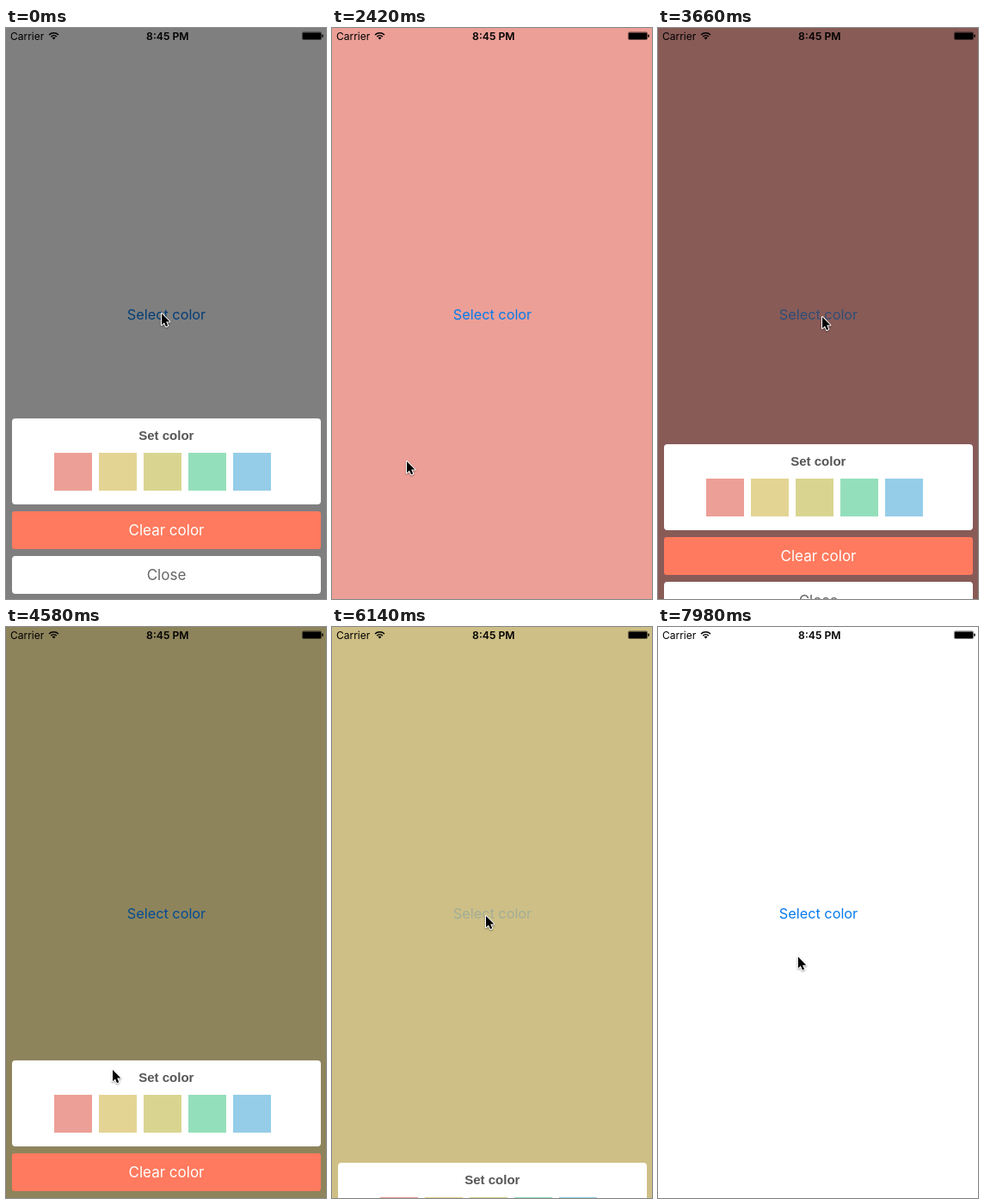
Recreate the animation shown at these times as an HTML page with a canvas. Size 372 px wide and 664 px high, loop 8 s.

```html
<!DOCTYPE html>
<html lang="en">
<head>
<meta charset="utf-8">
<title>Color sheet</title>
<style>
html, body { margin: 0; width: 100%; height: 100%; overflow: hidden; background: #fff; }
canvas { display: block; width: 372px; height: 664px; }
</style>
</head>
<body>
<canvas id="stage" width="372" height="664"></canvas>
<script>
const ctx = document.getElementById('stage').getContext('2d');
const W = 372, H = 664, LOOP = 8000;
const SANS = 'Inter, Roboto, sans-serif';
const SWATCHES = ['#ec9f97', '#e4d494', '#d9d591', '#94dfbb', '#95cde8'];
const SHEET_TRAVEL = 210, SLIDE = 300;

// Times at which the sheet starts to open or close
const OPENS = [3433, 6056];
const CLOSES = [
  { at: 1850, color: SWATCHES[0] },
  { at: 4486, color: SWATCHES[1] },
  { at: 7060, color: '#fff' }
];

// Cursor stops: time, x, y
const PATH = [
  [0, 180, 330], [80, 180, 330], [1250, 86, 508], [1900, 86, 508],
  [2300, 86, 502], [2480, 86, 502], [3250, 190, 334], [3720, 190, 334],
  [4300, 123, 513], [4620, 123, 513], [4900, 123, 505], [4980, 123, 505],
  [5700, 178, 334], [6260, 178, 334], [6860, 121, 566], [6980, 121, 566],
  [7180, 121, 576], [7420, 121, 576], [8000, 162, 381]
];

const clamp = v => Math.min(1, Math.max(0, v));
const ease = v => (v = clamp(v), v * v * (3 - 2 * v));
const mix = (a, b, p) => a + (b - a) * p;

function cursorAt(t) {
  const i = Math.max(1, PATH.findIndex(k => k[0] > t));
  const [t0, x0, y0] = PATH[i - 1], [t1, x1, y1] = PATH[i];
  const p = ease((t - t0) / (t1 - t0));
  return [mix(x0, x1, p), mix(y0, y1, p)];
}

function sheetAt(t) {
  let p = 1;
  for (const c of CLOSES) p -= ease((t - c.at) / SLIDE);
  for (const at of OPENS) p += ease((t - at) / SLIDE);
  return p;
}

function backdropAt(t) {
  const last = CLOSES.filter(c => t >= c.at).pop();
  return last ? last.color : '#fff';
}

function linkAlpha(t) {
  for (const at of OPENS) {
    if (t >= at - 110 && t < at + 420) return mix(0.2, 1, ease((t - at - 60) / 300));
  }
  return 1;
}

function text(str, x, y, font, color, align = 'center') {
  ctx.font = font;
  ctx.fillStyle = color;
  ctx.textAlign = align;
  ctx.fillText(str, x, y);
}

function panel(x, y, w, h, r, color) {
  ctx.fillStyle = color;
  ctx.beginPath();
  ctx.roundRect(x, y, w, h, r);
  ctx.fill();
}

function wifi(x, y) {
  const a = -Math.PI * 0.75, b = -Math.PI * 0.25;
  ctx.strokeStyle = ctx.fillStyle = '#000';
  ctx.lineWidth = 1.6;
  for (const r of [4.6, 7.7]) {
    ctx.beginPath();
    ctx.arc(x, y, r, a, b);
    ctx.stroke();
  }
  ctx.beginPath();
  ctx.moveTo(x, y);
  ctx.arc(x, y, 2.7, a, b);
  ctx.fill();
}

function statusBar() {
  text('Carrier', 5, 13.5, '400 12px ' + SANS, '#000', 'left');
  wifi(55.5, 13.4);
  text('8:45 PM', 187.8, 13.5, '600 12.2px ' + SANS, '#000');
  ctx.strokeStyle = 'rgba(0,0,0,.75)';
  ctx.lineWidth = 0.7;
  ctx.beginPath();
  ctx.roundRect(344.4, 4.9, 22.2, 8.6, 1.5);
  ctx.stroke();
  panel(345, 5.4, 21, 7.6, 0.8, '#000');
  panel(367.3, 7.5, 1.4, 3.4, 0.7, '#000');
}

function sheet(offset) {
  ctx.save();
  ctx.translate(0, Math.round(offset));
  panel(7, 454, 359, 100, 4, '#fff');
  text('Set color', 186.3, 479, 'bold 15px "Liberation Sans", Arial, sans-serif', '#555');
  SWATCHES.forEach((color, i) => {
    ctx.fillStyle = color;
    ctx.fillRect(56 + 52 * i, 494, 44, 44);
  });
  panel(7, 562, 359, 44, 3, '#ff7a5e');
  text('Clear color', 186.5, 590, '400 17px ' + SANS, '#fff');
  panel(7, 614, 359, 44, 4, '#fff');
  text('Close', 186.5, 642, '400 17px ' + SANS, '#666');
  ctx.restore();
}

const arrow = new Path2D('M1 2V15.2L4 12.4L6 17.2L8.2 16.3L6.2 11.6H10.4Z');

function cursor(x, y) {
  ctx.save();
  ctx.translate(x, y);
  ctx.lineJoin = 'round';
  ctx.lineWidth = 2;
  ctx.strokeStyle = '#fff';
  ctx.shadowColor = 'rgba(0,0,0,.4)';
  ctx.shadowBlur = 2;
  ctx.shadowOffsetY = 1;
  ctx.stroke(arrow);
  ctx.shadowColor = 'transparent';
  ctx.fillStyle = '#000';
  ctx.fill(arrow);
  ctx.restore();
}

function draw() {
  const t = performance.now() % LOOP;
  const shown = sheetAt(t);
  ctx.fillStyle = backdropAt(t);
  ctx.fillRect(0, 0, W, H);

  ctx.globalAlpha = linkAlpha(t);
  text('Select color', 186.5, 338.5, '400 16.3px ' + SANS, '#067bec');
  ctx.globalAlpha = 1;

  ctx.fillStyle = `rgba(0,0,0,${0.5 * shown})`;
  ctx.fillRect(0, 0, W, H);
  statusBar();
  if (shown > 0) sheet(SHEET_TRAVEL * (1 - shown));
  cursor(...cursorAt(t));
  requestAnimationFrame(draw);
}
draw();
</script>
</body>
</html>
```
